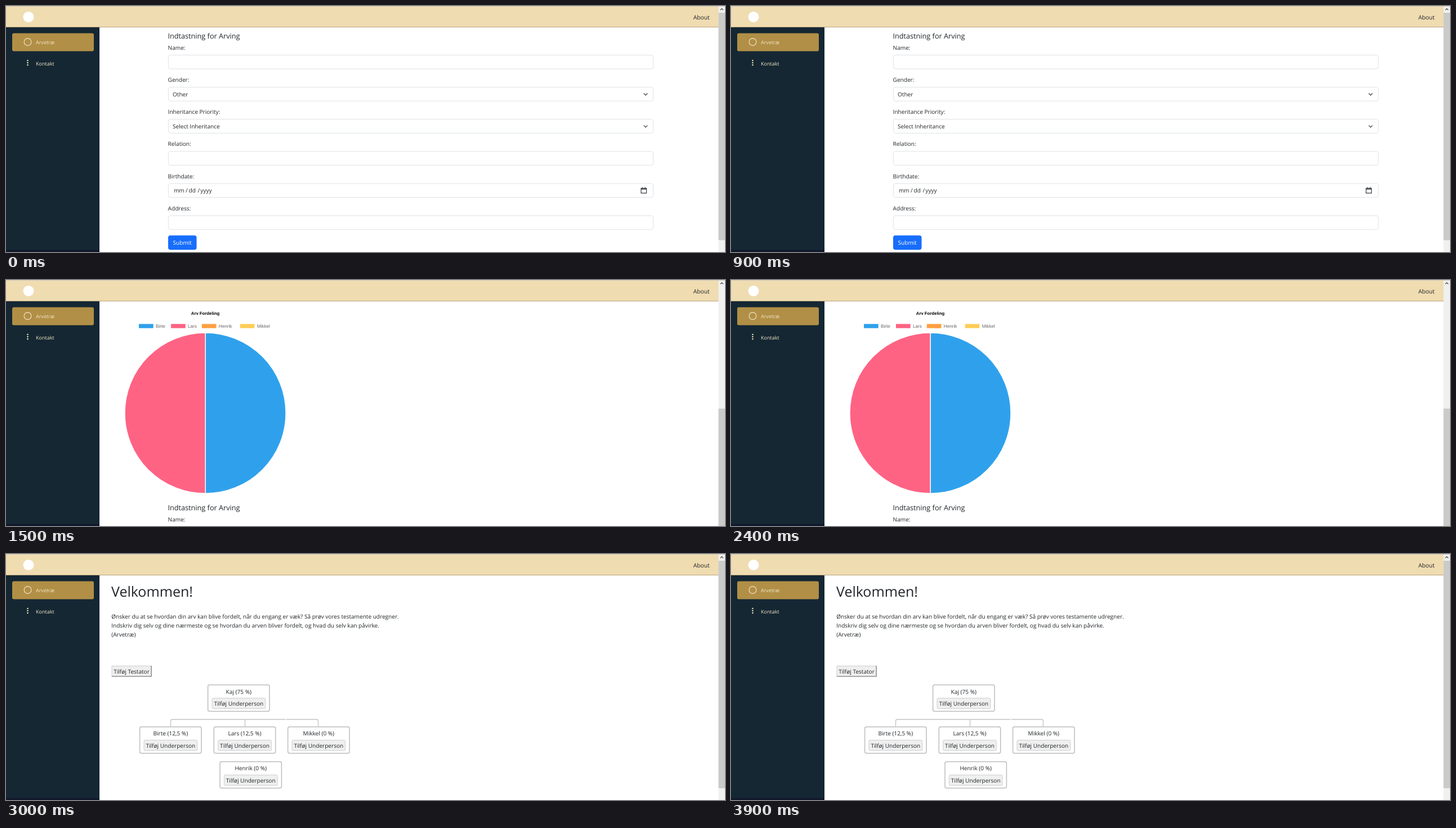
These frames come from a looping animation (1277 by 438 pixels, 4500 ms). An HTML page:

```html
<!DOCTYPE html>
<html lang="da">
<head>
<meta charset="utf-8">
<title>Arvetræ</title>
<style>
  html, body { margin: 0; width: 100%; height: 100%; overflow: hidden; background: #fff; }
  svg { display: block; width: 1277px; height: 438px; }
  text { font: 10.08px "Open Sans", "Noto Sans", sans-serif; fill: #212529; text-rendering: geometricPrecision; }
  .title { font-size: 12.7px; }
  .hero { font-size: 25px; }
  .nav { font-size: 9px; fill: #f4e6c6; }
  .legend, .chart-title { font: 8.2px "Liberation Sans", Arial, sans-serif; fill: #666; }
  .chart-title { font-size: 7.75px; font-weight: bold; fill: #000; }
  .mid { text-anchor: middle; }
  .field { fill: #fff; stroke: #dee2e6; }
  .icon { fill: none; stroke: #343a40; stroke-width: 1.2; }
  .card { fill: #fff; stroke: #bdbdbd; stroke-width: 1.5; }
  .button { fill: #efefef; stroke: #cdcdcd; }
  .branch { fill: none; stroke: #c2c2c2; stroke-width: 1.3; }
</style>
</head>
<body>
<svg viewBox="0 0 1277 438">
  <g id="form"></g>
  <g id="chart"></g>
  <g id="tree"></g>

  <rect y="37" width="166" height="401" fill="#142733"/>
  <rect y="434.5" width="166" height="3.5" fill="#12182c"/>
  <rect x="11" y="48.5" width="145" height="32" rx="3" fill="#b18f46"/>
  <circle cx="38.5" cy="64" r="6.4" fill="none" stroke="#f4e6c6" stroke-width="1.1"/>
  <g fill="#f0e2b8">
    <circle cx="38.5" cy="97" r="1.3"/>
    <circle cx="38.5" cy="101" r="1.3"/>
    <circle cx="38.5" cy="105" r="1.3"/>
  </g>
  <text class="nav" x="53" y="68.3">Arvetræ</text>
  <text class="nav" x="53" y="105.5">Kontakt</text>

  <rect width="1266" height="38" fill="#f0dcb1"/>
  <rect y="37" width="1266" height="1" fill="#b9a47b"/>
  <rect width="1277" height="1" fill="#cfcac0"/>
  <circle cx="40" cy="19.5" r="9.5" fill="#fff"/>
  <text x="1220.7" y="23.5" style="font-size:10.3px">About</text>

  <rect x="1265.5" y="1" width="11.5" height="437" fill="#f0f0ef"/>
  <rect id="thumb" x="1265.5" width="11.5" fill="#cacac9"/>
  <path d="M1268.7 7.3l2.6-2.6 2.6 2.6" fill="none" stroke="#555" stroke-width="1.3"/>
</svg>
<script>
const SCENE_MS = 1500;
const byId = id => document.getElementById(id);
const text = (x, y, content, cls = "") => `<text x="${x}" y="${y}" class="${cls}">${content}</text>`;
const rect = (x, y, w, h, cls, rx = 0) =>
  `<rect x="${x}" y="${y}" width="${w}" height="${h}" rx="${rx}" class="${cls}"/>`;

function buildForm() {
  const chevron = y => `<path class="icon" d="M1132.7 ${y + 11}l3.3 3.3 3.3-3.3"/>`;
  const calendar = y => `<path class="icon" d="M1128 ${y + 8.5}h9.5v8.5h-9.5zM1128 ${y + 10}h9.5M1130.3 ${y + 6.5}v2M1135.2 ${y + 6.5}v2"/>`;
  const select = value => y => text(296, y + 16.3, value) + chevron(y);
  const dateParts = [[298, "mm"], [319, "/"], [324.5, "dd"], [340.5, "/"], [345.3, "yyyy"]];
  const date = y => dateParts.map(([x, part]) => text(x, y + 16.3, part)).join("") + calendar(y);
  const fields = [
    ["Name:"],
    ["Gender:", select("Other")],
    ["Inheritance Priority:", select("Select Inheritance")],
    ["Relation:"],
    ["Birthdate:", date],
    ["Address:"],
  ];
  const rows = fields.map(([label, content], i) => {
    const y = 87.3 + i * 57.2;
    return text(287.6, y - 9.5, label) + rect(288.3, y, 861.4, 24.7, "field", 4) + (content ? content(y) : "");
  });
  return text(287.4, 57.8, "Indtastning for Arving", "title") + rows.join("") +
    '<rect x="288" y="408.5" width="50.5" height="25.5" rx="4" fill="#176dfb"/>' +
    '<text x="313.2" y="425.2" class="mid" style="fill:#fff">Submit</text>';
}

function buildChart() {
  const legend = [
    [236, "Birte", "#2fa1ec"], [293, "Lars", "#ff6384"],
    [347.8, "Henrik", "#ff9f40"], [415.7, "Mikkel", "#ffcd56"],
  ];
  const half = (sweep, color) =>
    `<path d="M354 94A143 143 0 0 ${sweep} 354 380z" fill="${color}" stroke="#fff" stroke-width="1.3"/>`;
  return text(354, 62.4, "Arv Fordeling", "chart-title mid") +
    legend.map(([x, name, color]) =>
      `<rect x="${x}" y="78.3" width="25.7" height="7.4" fill="${color}"/>` +
      text(x + 30, 84.6, name, "legend")).join("") +
    half(1, "#2fa1ec") + half(0, "#ff6384");
}

function buildTree() {
  const people = [
    [413.3, 233, "Kaj (75 %)"],
    [292.3, 307.7, "Birte (12,5 %)"],
    [424, 307.7, "Lars (12,5 %)"],
    [555.3, 307.7, "Mikkel (0 %)"],
    [434.7, 369.7, "Henrik (0 %)"],
  ];
  const card = ([x, y, label]) =>
    rect(x - 54.7, y, 109.4, 47, "card", 3) + text(x, y + 15.7, label, "mid") +
    rect(x - 47.3, y + 23.7, 94.6, 18.6, "button", 2) + text(x, y + 37, "Tilføj Underperson", "mid");
  return text(187, 76.3, "Velkommen!", "hero") +
    text(187.2, 115, "Ønsker du at se hvordan din arv kan blive fordelt, når du engang er væk? Så prøv vores testamente udregner.") +
    text(187.2, 131, "Indskriv dig selv og dine nærmeste og se hvordan du arven bliver fordelt, og hvad du selv kan påvirke.") +
    text(187.2, 147, "(Arvetræ)") +
    rect(188, 199.3, 70, 18.5, "button") +
    '<path d="M188 217.8h70.2v-18.8" fill="none" stroke="#858585" stroke-width="1.3"/>' +
    text(223, 212.7, "Tilføj Testator", "mid") +
    '<path class="branch" d="M292.5 307v-9.5q0-3 3-3H496.3M497.7 294.5H551.5q3 0 3 3V307M424.5 294.5V307"/>' +
    people.map(card).join("");
}

byId("form").innerHTML = buildForm();
byId("chart").innerHTML = buildChart();
byId("tree").innerHTML = buildTree();

const scenes = [
  { visible: ["form"], formY: 0, thumb: [12, 417] },
  { visible: ["form", "chart"], formY: 352.3, thumb: [229, 438] },
  { visible: ["tree"], formY: 0, thumb: [12, 417] },
];

function draw() {
  const scene = scenes[Math.floor(performance.now() / SCENE_MS) % scenes.length];
  for (const id of ["form", "chart", "tree"])
    byId(id).style.display = scene.visible.includes(id) ? "" : "none";
  byId("form").setAttribute("transform", `translate(0 ${scene.formY})`);
  const [top, bottom] = scene.thumb;
  byId("thumb").setAttribute("y", top);
  byId("thumb").setAttribute("height", bottom - top);
  requestAnimationFrame(draw);
}
draw();
</script>
</body>
</html>
```
